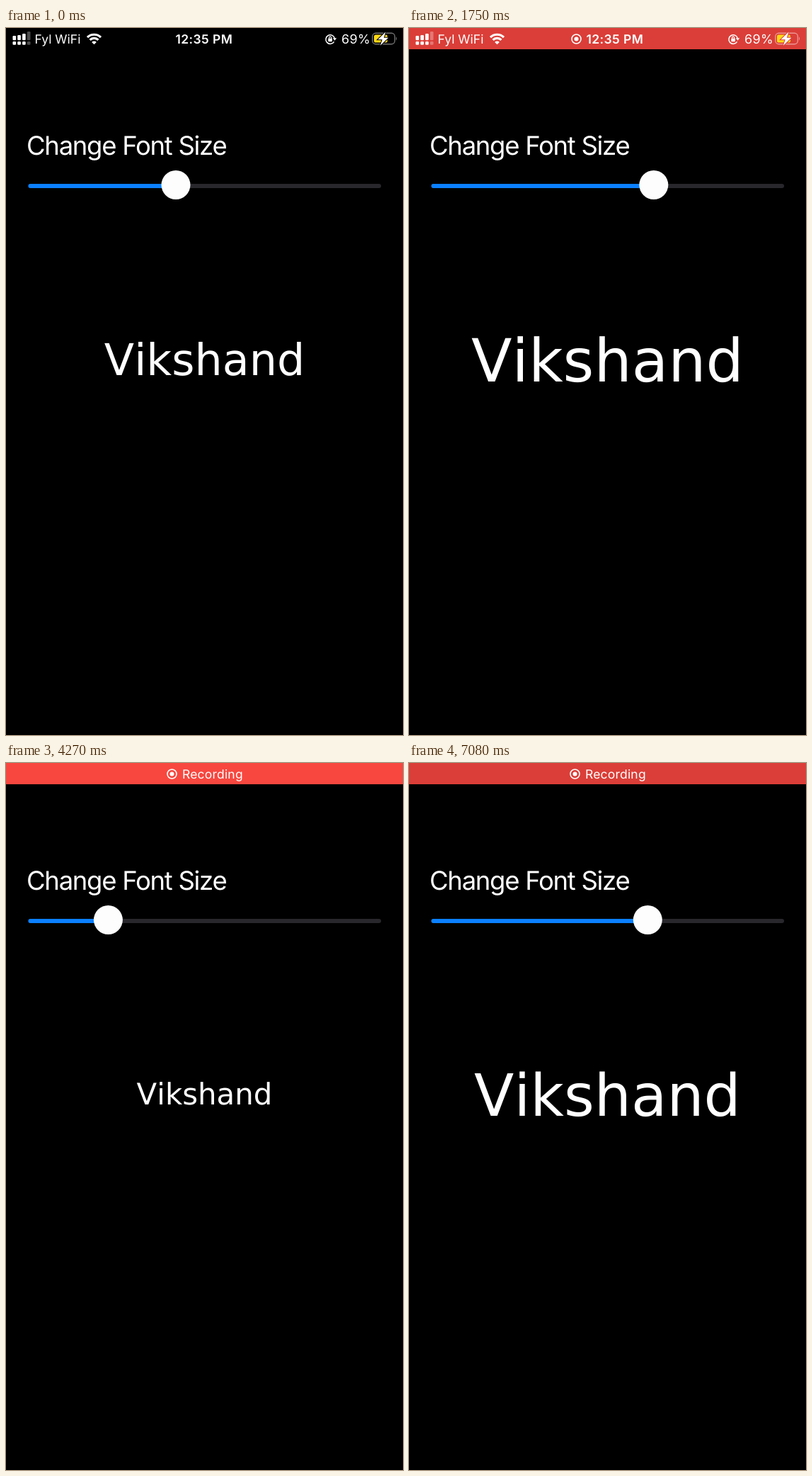
Animation of 561x998 px, one loop 7130 ms. Source, as an HTML page:

```html
<!DOCTYPE html>
<html lang="en">
<head>
<meta charset="utf-8">
<title>Font size slider</title>
<style>
  html, body { margin: 0; width: 100%; height: 100%; overflow: hidden; background: #000; }
  svg { display: block; width: 561px; height: 998px; }
  text {
    fill: #fff;
    font: 17.5px Inter, Roboto, sans-serif;
    font-optical-sizing: none;
    text-rendering: geometricPrecision;
  }
  .title { font-size: 36.5px; letter-spacing: -1.3px; }
  .clock { font-weight: 600; letter-spacing: .4px; }
  .label { font-family: "DejaVu Sans", sans-serif; font-kerning: none; text-anchor: middle; }
  .line { fill: none; stroke: #fff; }
  .bolt { stroke: currentColor; stroke-width: 2; paint-order: stroke; }
</style>
</head>
<body>
<svg id="stage" viewBox="0 0 561 998">
  <rect width="561" height="30" fill="currentColor"/>

  <g id="status" fill="#fff">
    <g id="signal"></g>
    <text x="40.5" y="21.8">Fyl WiFi</text>
    <g class="line" stroke-width="3.2">
      <path d="M115 13.2a13.4 13.4 0 0 1 19 0"/>
      <path d="M118.6 16.9a8.3 8.3 0 0 1 11.8 0"/>
    </g>
    <path d="M124.5 23.2l-3.3-3.3a4.7 4.7 0 0 1 6.6 0z"/>

    <g id="clockDot">
      <circle class="line" cx="236.5" cy="15.5" r="6.5" stroke-width="1.6"/>
      <circle cx="236.5" cy="15.5" r="3"/>
    </g>
    <text id="time" class="clock" y="21.8">12:35 PM</text>

    <path class="line" stroke-width="1.5" d="M463.6 19.4a6.3 6.3 0 1 1 .8-4.6"/>
    <path d="M461.8 14.2h5.4l-2.7 3.6z"/>
    <rect x="455.3" y="14.8" width="5.6" height="4.4" rx=".8"/>
    <path class="line" stroke-width="1.2" d="M456.6 15v-1.4a1.5 1.5 0 0 1 3 0V15"/>
    <text x="474" y="21.8" style="font-size:18px" letter-spacing=".3">69%</text>

    <rect class="line" x="517.8" y="7.3" width="31.6" height="15.4" rx="4.6" stroke-width="1.4" opacity=".45"/>
    <path d="M551 12.3q2 2.7 0 5.4z" opacity=".5"/>
    <rect x="520" y="9.5" width="19" height="11" rx="2.6" fill="#ffd915"/>
    <path class="bolt" d="M536.5 5.5L525.5 16.3h6.2l-2.8 8.4 11.4-11h-6.4z"/>
  </g>

  <g id="recording" fill="#fff">
    <circle class="line" cx="234.5" cy="15.5" r="6.5" stroke-width="1.6"/>
    <circle cx="234.5" cy="15.5" r="3"/>
    <text x="249" y="21.8" letter-spacing=".2">Recording</text>
  </g>

  <text class="title" x="29" y="179">Change Font Size</text>
  <rect x="31.5" y="220" width="498.5" height="6" rx="3" fill="#28272b"/>
  <rect id="fill" x="31.5" y="220" height="6" rx="3" fill="#0b80ff"/>
  <circle id="knob" cy="221.5" r="20.5" fill="#fdfdfe"/>
  <text id="label" class="label" x="280.5">Vikshand</text>
</svg>

<script>
const LOOP = 7130;
const $ = id => document.getElementById(id);

// Knob centre and red level of the bar, as [ms, value]
const knobKeys = [
  [0, 240], [150, 240], [650, 150], [1050, 196.5], [1450, 276], [2100, 395.7],
  [2970, 395.7], [3530, 259.5], [3710, 238], [4270, 144.5], [4700, 120],
  [5210, 144], [5630, 232.5], [6250, 395.7], [6680, 347], [7080, 337.3], [LOOP, 337.3]
];
const redKeys = [
  [0, 0], [300, 0], [500, 250], [1050, 235], [1700, 219], [3000, 219],
  [3530, 223], [4270, 248], [4600, 255], [5650, 255], [6900, 219], [LOOP, 219]
];

const clamp = v => Math.max(0, Math.min(1, v));

// Monotone cubic curve through the keys
function curve(keys, t) {
  const slope = i => i < 0 || i > keys.length - 2 ? 0 :
    (keys[i + 1][1] - keys[i][1]) / (keys[i + 1][0] - keys[i][0]);
  const tangent = i => {
    const a = slope(i - 1), b = slope(i);
    return a * b > 0 ? 2 * a * b / (a + b) : 0;
  };
  let i = 0;
  while (i < keys.length - 2 && t >= keys[i + 1][0]) i++;
  const [t0, v0] = keys[i], [t1, v1] = keys[i + 1];
  const h = t1 - t0, u = (t - t0) / h, w = 1 - u;
  return v0 * (1 + 2 * u) * w * w + v1 * u * u * (3 - 2 * u) +
    h * u * w * (tangent(i) * w - tangent(i + 1) * u);
}

function set(id, attrs) {
  for (const name in attrs) $(id).setAttribute(name, attrs[name]);
}

// Dual signal meter: bars above, dots below, last column dim
$("signal").innerHTML = [11, 10, 8, 5].map((top, i) => {
  const rect = (y, h) =>
    `<rect x="${9.5 + i * 6.8}" y="${y}" width="4.6" height="${h}" rx="1.2"/>`;
  return `<g opacity="${i < 3 ? 1 : 0.3}">${rect(top, 17.3 - top)}${rect(19, 4.8)}</g>`;
}).join("");

function draw(t) {
  const x = curve(knobKeys, t);
  const size = 41.93 + 0.2095 * (x - 144.5);
  set("knob", { cx: x });
  set("fill", { width: x - 31.5 });
  set("label", { y: 465.4 + 0.3975 * size });
  $("label").style.fontSize = size + "px";

  const red = curve(redKeys, t);
  $("stage").style.color = `rgb(${red}, ${red * 0.285}, ${red * 0.255})`;

  const live = t >= 350;
  set("clockDot", { opacity: live ? 1 : 0 });
  set("time", { x: live ? 250.5 : 239.5 });
  const swap = clamp((t - 1800) / 200);
  set("status", { opacity: 1 - swap });
  set("recording", { opacity: swap });
}

const start = performance.now();
function tick() {
  draw((performance.now() - start) % LOOP);
  requestAnimationFrame(tick);
}
tick();
</script>
</body>
</html>
```
